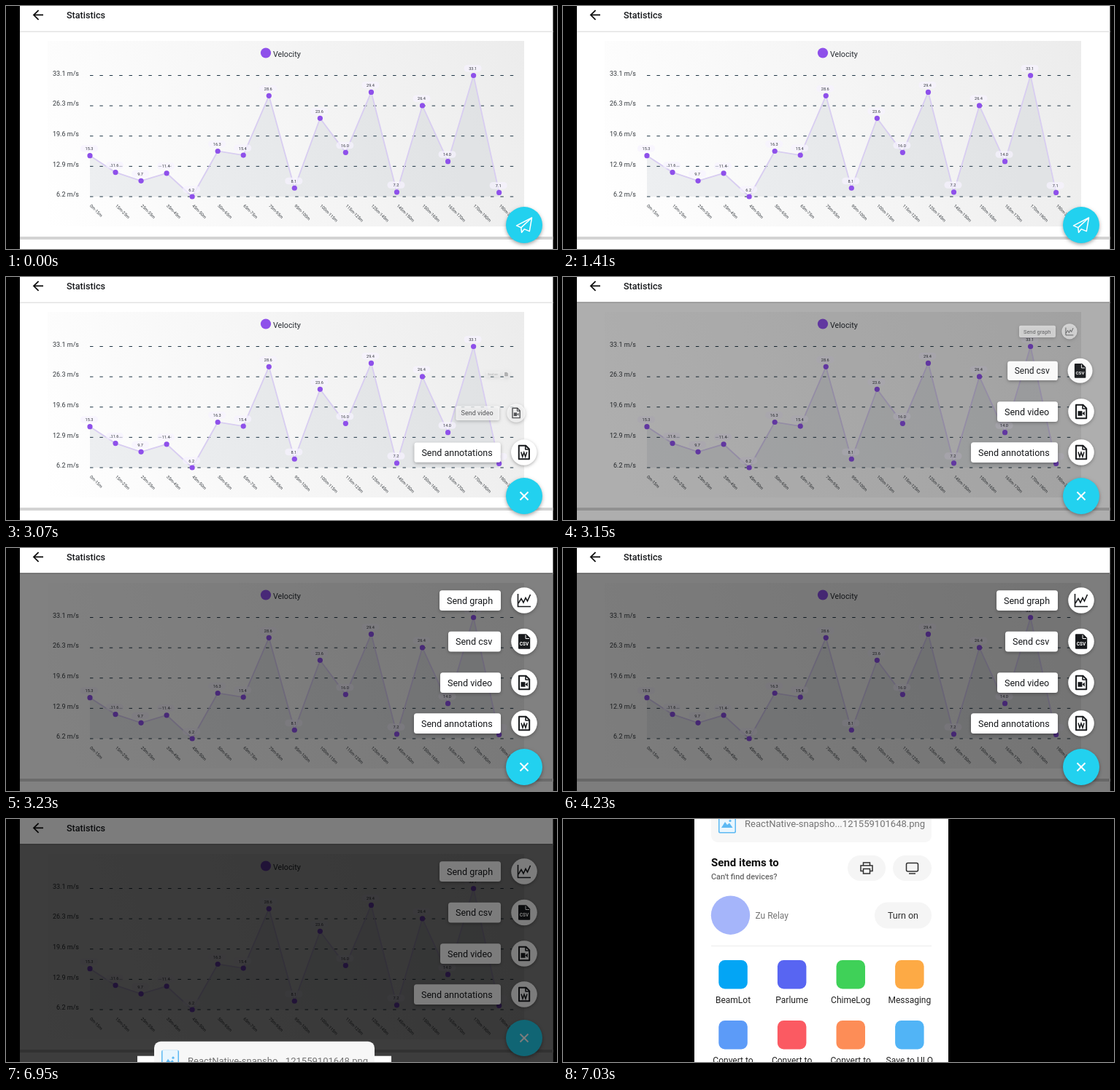
An HTML page with a canvas for the animation above (8000 ms loop, 755 px wide and 334 px high).

```html
<!DOCTYPE html>
<html lang="en">
<head>
<meta charset="utf-8">
<title>Statistics</title>
<style>
html, body { margin: 0; width: 100%; height: 100%; overflow: hidden; background: #000; }
canvas { display: block; width: 755px; height: 334px; }
</style>
</head>
<body>
<canvas id="stage"></canvas>
<script>
const W = 755, H = 334, LOOP = 8000;
const canvas = document.getElementById('stage');
const ctx = canvas.getContext('2d');
const dpr = window.devicePixelRatio || 1;
canvas.width = W * dpr;
canvas.height = H * dpr;

const INK = '#17191c', PURPLE = '#8e50ea', CYAN = '#22d1ef';
const speeds = [15.3, 11.6, 9.7, 11.4, 6.2, 16.3, 15.4, 28.6, 8.1,
  23.6, 16, 29.4, 7.2, 26.4, 14, 33.1, 7.1];
const marks = [0, 15, 25, 35, 45, 50, 65, 75, 95, 100, 115, 125, 145, 150, 165, 170, 190, 200];
const yOf = v => 262 - (v - 6.2) * 166.5 / 26.9;
const points = speeds.map((v, i) => [115 + i * 35.04, yOf(v)]);

const menu = [
  { text: 'Send annotations', left: 559, y: 241, icon: wordIcon },
  { text: 'Send video', left: 595, y: 185, icon: videoIcon },
  { text: 'Send csv', left: 606, y: 128.5, icon: csvIcon },
  { text: 'Send graph', left: 594, y: 72, icon: graphIcon }
];
const apps = [
  ['BeamLot', '#03a5f5'], ['Parlume', '#5865f2'], ['ChimeLog', '#3fd158'], ['Messaging', '#fdaa45'],
  ['Convert to', '#5c9bf8'], ['Convert to', '#fb5a62'], ['Convert to', '#fd8d57'], ['Save to ULO', '#51b4f6']
];

const clamp = x => Math.max(0, Math.min(1, x));
const smooth = x => { x = clamp(x); return x * x * (3 - 2 * x); };
const easeOut = x => 1 - (1 - clamp(x)) ** 2;
const hold = t => Math.floor((t - 30) / 80) * 80 + 30;

function rect(x, y, w, h, color) {
  ctx.fillStyle = color;
  ctx.fillRect(x, y, w, h);
}
function round(x, y, w, h, r, color) {
  ctx.beginPath();
  ctx.roundRect(x, y, w, h, r);
  ctx.fillStyle = color;
  ctx.fill();
}
function disc(x, y, r, color) {
  ctx.beginPath();
  ctx.arc(x, y, r, 0, 7);
  ctx.fillStyle = color;
  ctx.fill();
}
function trace(list, close) {
  ctx.beginPath();
  list.forEach(p => ctx.lineTo(...p));
  if (close) ctx.closePath();
}
function line(list, color, width, close) {
  trace(list, close);
  ctx.strokeStyle = color;
  ctx.lineWidth = width;
  ctx.stroke();
}
function text(s, x, y, size, color, align = 'left', weight = 400) {
  ctx.font = `${weight} ${size}px Roboto, sans-serif`;
  ctx.textAlign = align;
  ctx.fillStyle = color;
  ctx.fillText(s, x, y);
}
function shadow(draw, blur, dy, alpha) {
  ctx.save();
  ctx.shadowColor = `rgba(0,0,0,${alpha})`;
  ctx.shadowBlur = blur * dpr;
  ctx.shadowOffsetY = dy * dpr;
  draw();
  ctx.restore();
}

function drawChart() {
  const bg = ctx.createLinearGradient(57, 303, 710, 48);
  bg.addColorStop(0, '#fff');
  bg.addColorStop(1, '#ececec');
  rect(57, 48, 653, 255, bg);

  disc(356, 64.5, 7.1, PURPLE);
  text('Velocity', 366, 70, 10.7, '#252a30');

  ctx.setLineDash([4.46, 8.93]);
  for (let i = 0; i < 5; i++) {
    const y = 95.5 + i * 41.63;
    line([[115, y], [704, y]], '#1d3444', 1);
    text([33.1, 26.3, 19.6, 12.9, 6.2][i] + ' m/s', 100, y + 0.3, 9, '#33383d', 'right');
  }
  ctx.setLineDash([]);

  trace([[115, 262], ...points, [points[16][0], 262]], true);
  ctx.fillStyle = 'rgba(80,105,125,0.09)';
  ctx.fill();
  line(points, '#d8cdf1', 1.8);

  points.forEach(([x, y], i) => {
    disc(x, y, 3.6, PURPLE);
    round(x - 13, y - 14.5, 24, 9.5, 4.5, 'rgba(247,242,255,0.7)');
    text(speeds[i].toFixed(1), x - 1, y - 7.5, 5.6, '#30343a', 'center');
    ctx.save();
    ctx.translate(x - 0.5, 275);
    ctx.rotate(Math.PI / 4);
    text(`${marks[i]}m-${marks[i + 1]}m`, 0, 0, 5.8, '#33383d');
    ctx.restore();
  });
}

function drawPage(dim) {
  rect(19, 0, 730.5, H, '#fff');
  drawChart();
  rect(19, 317, 730.5, 4, '#d3d3d3');
  rect(19, 34.5, 730.5, 1.5, '#e4e4e4');
  rect(19, 34, 730.5, 300, `rgba(0,0,0,${dim})`);
  text('Statistics', 83, 17.3, 12.6, INK, 'left', 500);
  line([[51, 12.3], [38, 12.3]], '#111', 1.8);
  line([[44.6, 5.8], [38, 12.3], [44.6, 18.8]], '#111', 1.8);
}

function drawFab(open) {
  shadow(() => disc(710, 301, 25, CYAN), 5, 2, 0.35);
  if (open) {
    line([[704.5, 295.5], [715.5, 306.5]], '#fff', 2);
    line([[715.5, 295.5], [704.5, 306.5]], '#fff', 2);
    return;
  }
  ctx.lineJoin = 'round';
  line([[720.5, 291], [699.5, 301.8], [705.8, 304.6]], '#fff', 1.5);
  line([[720.5, 291], [705.8, 304.6], [706.6, 311.3], [710.2, 306.6], [717.3, 309.6]], '#fff', 1.5, true);
  ctx.lineJoin = 'miter';
}

function docIcon(filled) {
  const page = [[-7, -9.3], [2.5, -9.3], [7.2, -4.6], [7.2, 9.3], [-7, 9.3]];
  ctx.lineJoin = 'round';
  line(page, INK, 2, true);
  if (filled) {
    ctx.fillStyle = INK;
    ctx.fill();
  }
  line([[2, -9], [2, -4], [7, -4]], filled ? '#fff' : INK, filled ? 1 : 1.6);
  ctx.lineJoin = 'miter';
}
function wordIcon() {
  docIcon();
  line([[-4, -0.5], [-2, 6], [0, 0], [2, 6], [4, -0.5]], INK, 1.5);
}
function videoIcon() {
  docIcon();
  rect(-4.5, -0.8, 6, 6.6, INK);
  trace([[1.5, 2.5], [4.8, -0.4], [4.8, 5.4]], true);
  ctx.fill();
}
function csvIcon() {
  docIcon(true);
  text('CSV', 0, 5.8, 6.5, '#fff', 'center', 700);
}
function graphIcon() {
  line([[-8.5, -9], [-8.5, 8.5], [9, 8.5]], INK, 1.6);
  line([[-8, 4], [-4, -2.5], [-1, 3], [2, -3.5], [4.5, 1], [8.5, -8]], INK, 1.6);
}

function drawItem({ text: label, left, y, icon }, s) {
  if (s <= 0) return;
  const cx = (left + 747) / 2, cy = y + 7;
  ctx.save();
  ctx.globalAlpha = s;
  ctx.translate(cx, cy);
  ctx.scale(s, s);
  ctx.translate(-cx, -cy);
  shadow(() => {
    round(left, y - 13.7, 678 - left, 27.6, 3.5, '#fff');
    disc(710, y, 17.8, '#fff');
  }, 4, 1.5, 0.3);
  text(label, left + 10, y + 4.7, 12.55, INK);
  ctx.translate(710, y);
  icon();
  ctx.restore();
}

function drawTouch(x, y, a) {
  if (a <= 0) return;
  ctx.save();
  ctx.globalAlpha = a;
  disc(x, y, 9.5, 'rgba(255,255,255,0.55)');
  ctx.strokeStyle = 'rgba(150,150,160,0.5)';
  ctx.lineWidth = 1;
  ctx.stroke();
  ctx.restore();
}

function drawSheet(dy) {
  ctx.save();
  ctx.translate(0, dy);
  rect(180, 0, 348, H, '#fff');
  round(203, -20, 302, 52, 9, '#f7f7f7');
  round(213, -8, 24, 27.5, 2, '#5db9f3');
  round(214.5, -8, 21, 26, 1, '#e9f6fe');
  trace([[217, 12], [222, 4], [225, 8], [228, 5.5], [232.5, 12]], true);
  ctx.fillStyle = '#5db9f3';
  ctx.fill();
  disc(229, 2.5, 1.6, '#5db9f3');
  text('ReactNative-snapsho...121559101648.png', 249, 11, 13.05, '#737373');

  text('Send items to', 203, 65.3, 15, '#0c0c0c', 'left', 700);
  text("Can't find devices?", 203, 83, 10.9, '#686868', 'left', 500);

  const key = '#303030';
  round(390, 50, 52, 35, 17.5, '#f5f5f5');
  round(452, 50, 53, 35, 17.5, '#f5f5f5');
  line([[411.5, 64], [411.5, 60], [420.5, 60], [420.5, 64]], key, 1.5);
  line([[411, 71.5], [408, 71.5], [408, 64], [424, 64], [424, 71.5], [421, 71.5]], key, 1.5);
  line([[411.5, 68.5], [420.5, 68.5], [420.5, 75], [411.5, 75]], key, 1.5, true);
  ctx.beginPath();
  ctx.roundRect(470.5, 60.5, 16, 11.5, 2);
  ctx.stroke();
  line([[474, 75], [483, 75]], key, 1.5);

  disc(229.5, 132.2, 26.7, '#a5b5fa');
  text('Zu Relay', 263.5, 137, 12, '#757575');
  round(427, 114.5, 78, 36, 18, '#f5f5f5');
  text('Turn on', 466, 137, 12.5, '#303030', 'center');
  rect(203, 174, 302, 1, '#ececec');

  apps.forEach(([name, color], i) => {
    const x = 233 + i % 4 * 80.6, y = 194 + (i >> 2) * 83;
    round(x - 19.7, y, 39.5, 39.5, 8.5, color);
    text(name, x, y + 59, 12, '#222', 'center');
  });
  ctx.restore();
}

function render(t) {
  ctx.setTransform(dpr, 0, 0, dpr, 0, 0);
  rect(0, 0, W, H, '#000');
  const slide = easeOut((t - 6950) / 80);
  if (slide < 1) {
    const step = t < 3310 ? hold(t) : t;
    drawPage(0.51 * easeOut((step - 3080) / 180));
    menu.forEach((item, i) => drawItem(item, smooth((step - 2926 - i * 46.5) / 150)));
    drawFab(t >= 2870);
    drawTouch(710, 301, 0.5 * clamp((t - 2630) / 80) * clamp((2870 - t) / 80));
    drawTouch(711, 72, clamp((t - 5730) / 80) * clamp((6130 - t) / 160));
    if (t >= 6950) rect(0, 0, W, H, `rgba(0,0,0,${0.5 + 0.5 * slide})`);
  }
  if (t >= 6950) drawSheet((1 - slide) * H);
}

function tick() {
  render(performance.now() % LOOP);
  requestAnimationFrame(tick);
}
tick();
</script>
</body>
</html>
```
